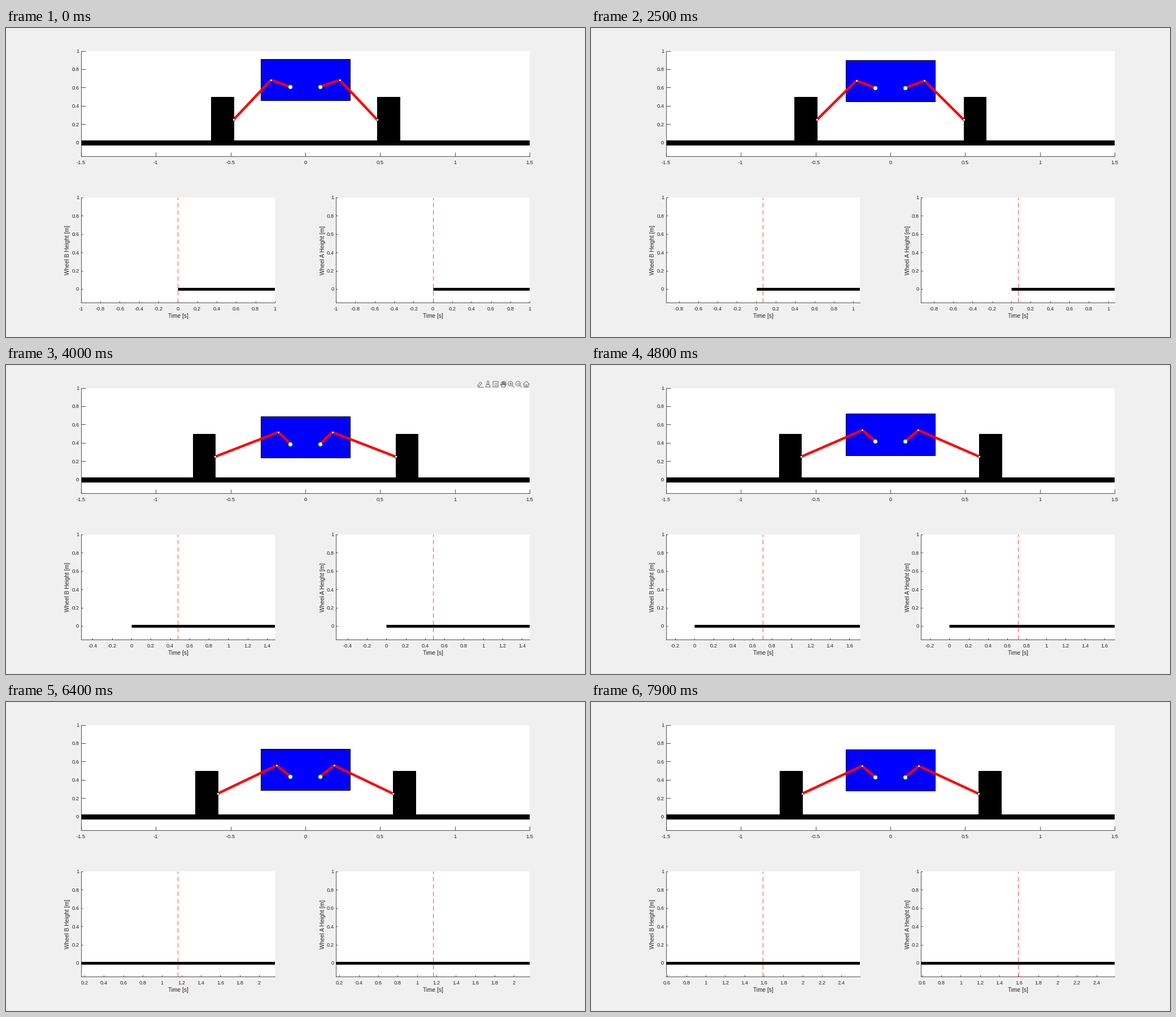
Animation of 1025x547 px, one loop 8000 ms. Source, as a matplotlib script:

```python
import numpy as np
import matplotlib.pyplot as plt
from matplotlib.animation import FuncAnimation
from matplotlib.patches import Circle, Polygon, Rectangle
from matplotlib.ticker import FuncFormatter, MultipleLocator

W, H, DPI = 1025, 547, 64
PX = 72 / DPI  # points per pixel
FRAMES, INTERVAL = 80, 100
INK, ICON = "#262626", "#606060"

plt.rcParams.update({
    "font.family": "Liberation Sans",
    "axes.unicode_minus": False,
    "axes.linewidth": 0.8 * PX,
    "axes.edgecolor": INK,
    "text.color": INK,
})

# An adaptive solver: each step is five times the last until it levels off,
# and every step is shown as four frames.
FRAMES_PER_STEP = 4
FULL_STEP = 0.1138
growth = 0.036 * 5.0 ** np.arange(-5, FRAMES // FRAMES_PER_STEP - 5)
step_ends = np.cumsum(growth / np.hypot(1, growth / FULL_STEP))

# Suspension: two bell cranks pivoting on the body, wheels sliding on the road.
PIVOT_X, SHORT_ARM, LONG_ARM = 0.1, 0.15, 0.5
WHEEL_W, WHEEL_H = 0.15, 0.5
REST, START = np.radians(52.7), np.radians(30)
DECAY, OMEGA = 2.99, 6.3


def sim_time(frame):
    times = np.append(0, step_ends)
    return np.interp(frame / FRAMES_PER_STEP, np.arange(len(times)), times)


def crank_angle(t):
    s = t * (1 - 0.22 * np.exp(-t / 0.13))  # softer start of the fall
    swing = np.cos(OMEGA * s) + DECAY / OMEGA * np.sin(OMEGA * s)
    return REST + (START - REST) * np.exp(-DECAY * s) * swing


def crank_points(angle):
    """Pivot, elbow and wheel hub on the right-hand side."""
    c, s = np.cos(angle), np.sin(angle)
    pivot_y = WHEEL_H / 2 + LONG_ARM * c - SHORT_ARM * s
    elbow = (PIVOT_X + SHORT_ARM * c, pivot_y + SHORT_ARM * s)
    hub = (elbow[0] + LONG_ARM * s, WHEEL_H / 2)
    return np.array([(PIVOT_X, pivot_y), elbow, hub])


def make_axes(left, bottom, width, xstep, tick_px):
    # Half a pixel up and left, so that edges snap down to whole pixels.
    ax = fig.add_axes([left - 0.5 / W, bottom + 0.5 / H, width, 0.3412])
    ax.set_ylim(-0.15, 1)
    ax.spines[["top", "right"]].set_visible(False)
    ax.xaxis.set_major_locator(MultipleLocator(xstep))
    ax.yaxis.set_major_locator(MultipleLocator(0.2))
    for axis in (ax.xaxis, ax.yaxis):
        axis.set_major_formatter(FuncFormatter(lambda v, _: f"{round(v, 1) + 0:g}"))
    ax.tick_params(direction="in", length=tick_px * PX, width=0.8 * PX, color=INK,
                   labelcolor=INK, labelsize=9.2 * PX)
    ax.tick_params(axis="x", pad=7.1 * PX)
    ax.tick_params(axis="y", pad=3.5 * PX)
    return ax


def pixel_text(x, y, text, rotation=0):
    fig.text(x / W, 1 - y / H, text, size=10.1 * PX, rotation=rotation,
             ha="center", va="center")


def dots(ax, size, edge):
    return ax.plot([], [], "o", ms=size * PX, mfc="white", mec=edge,
                   mew=0.7 * PX, zorder=5)[0]


def make_toolbar():
    """Export, brush, data tips, pan, zoom in, zoom out and home."""
    ax = fig.add_axes([0, 0, 1, 1])
    ax.set(xlim=(0, W), ylim=(H, 0))
    ax.axis("off")
    export, brush, tips, pan, zoom_in, zoom_out, home = 839.5 + 13.6 * np.arange(7)
    mid, parts = 34, []
    style = dict(fill=False, ec=ICON, lw=0.9 * PX, snap=False)

    def box(cx, dy, w, h):
        parts.append(ax.add_patch(Rectangle((cx - w / 2, mid + dy), w, h, **style)))

    def ring(cx, dy, r):
        parts.append(ax.add_patch(Circle((cx, mid + dy), r, **style)))

    def shape(cx, *points):
        parts.append(ax.add_patch(Polygon(np.add((cx, mid), points), **style)))

    def bar(cx, dy, half, slope=0):
        parts.extend(ax.plot([cx - half, cx + half],
                             [mid + dy - slope * half, mid + dy + slope * half],
                             color=ICON, lw=0.9 * PX))

    shape(export, (-5, 3), (0, -4), (3, -2), (-2, 4))
    bar(export, 4.5, 5)
    box(brush, -5.5, 3, 6)
    shape(brush, (-2.5, 0.5), (2.5, 0.5), (4, 5), (-4, 5))
    box(tips, -5, 9, 10)
    for dy in (-1.5, 1.5):
        bar(tips, dy, 2.2)
    for k in range(4):
        box(pan - 2.2 + 2 * k, abs(k - 1.2) - 5, 2, 5)
    shape(pan, (-5, 0), (-3, 1), (4.5, 0), (3, 5), (-2, 5))
    for cx in (zoom_in, zoom_out):
        ring(cx - 1, -1, 4)
        bar(cx - 1, -1, 2)
        bar(cx + 3.7, 3.7, 1.7, slope=1)
    box(zoom_in - 1, -3, 0, 4)
    shape(home, (-5.5, 0), (0, -5), (5.5, 0), (4, 0), (4, 5), (-4, 5), (-4, 0))
    box(home, 1, 2.6, 4)
    return parts


fig = plt.figure(figsize=(W / DPI, H / DPI), dpi=DPI, facecolor="#f0f0f0")

# Car view
car = make_axes(0.13, 0.5838, 0.775, 0.5, 7.5)
car.set_xlim(-1.5, 1.5)
body = car.add_patch(Rectangle((-0.3, 0), 0.6, 0.45, fc="blue", ec="black", lw=PX))
wheels = [car.add_patch(Rectangle((0, 0), WHEEL_W, WHEEL_H, fc="black", ec="black",
                                  lw=PX)) for _ in range(2)]
car.plot([-1.5, 1.5], [0, 0], color="black", lw=9 * PX, solid_capstyle="butt")
cranks = [car.plot([], [], color="red", lw=4.4 * PX, solid_capstyle="butt",
                   solid_joinstyle="round", zorder=4)[0] for _ in range(2)]
pivots = dots(car, 7, "lime")
joints = dots(car, 4, "black")

# Road height under each wheel
plots, cursors = [], []
for left, wheel in ((0.13, "B"), (0.5703, "A")):
    ax = make_axes(left, 0.11, 0.3347, 0.2, 3.4)
    ax.plot([0, 10], [0, 0], color="black", lw=5 * PX, solid_capstyle="butt")
    cursors.append(ax.plot([], [], color="red", lw=0.7 * PX, zorder=4,
                           dashes=(8 / 0.7 / PX * PX, 5 / 0.7))[0])
    plots.append(ax)
    x0 = left * W
    pixel_text(x0 + 171.5, 510, "Time [s]")
    pixel_text(x0 - 24, 393.5, f"Wheel {wheel} Height [m]", rotation=90)

toolbar = make_toolbar()


def update(frame):
    t = sim_time(frame)
    points = crank_points(crank_angle(t))
    pivot, elbow, hub = points

    body.set_y(pivot[1] - 0.15)
    wheels[0].set_x(-hub[0] - WHEEL_W)
    wheels[1].set_x(hub[0])
    for crank, side in zip(cranks, (-1, 1)):
        crank.set_data(side * points[:, 0], points[:, 1])
    pivots.set_data([-pivot[0], pivot[0]], [pivot[1]] * 2)
    joints.set_data([-elbow[0], elbow[0], -hub[0], hub[0]],
                    [elbow[1], elbow[1], hub[1], hub[1]])

    for ax, cursor in zip(plots, cursors):
        ax.set_xlim(t - 1, t + 1)
        cursor.set_data([t, t], [-0.15, 1])
    for part in toolbar:
        part.set_visible(35 <= frame < 44)


anim = FuncAnimation(fig, update, frames=FRAMES, init_func=lambda: update(0),
                     interval=INTERVAL, repeat=True, repeat_delay=0, blit=False)
plt.show()
```
